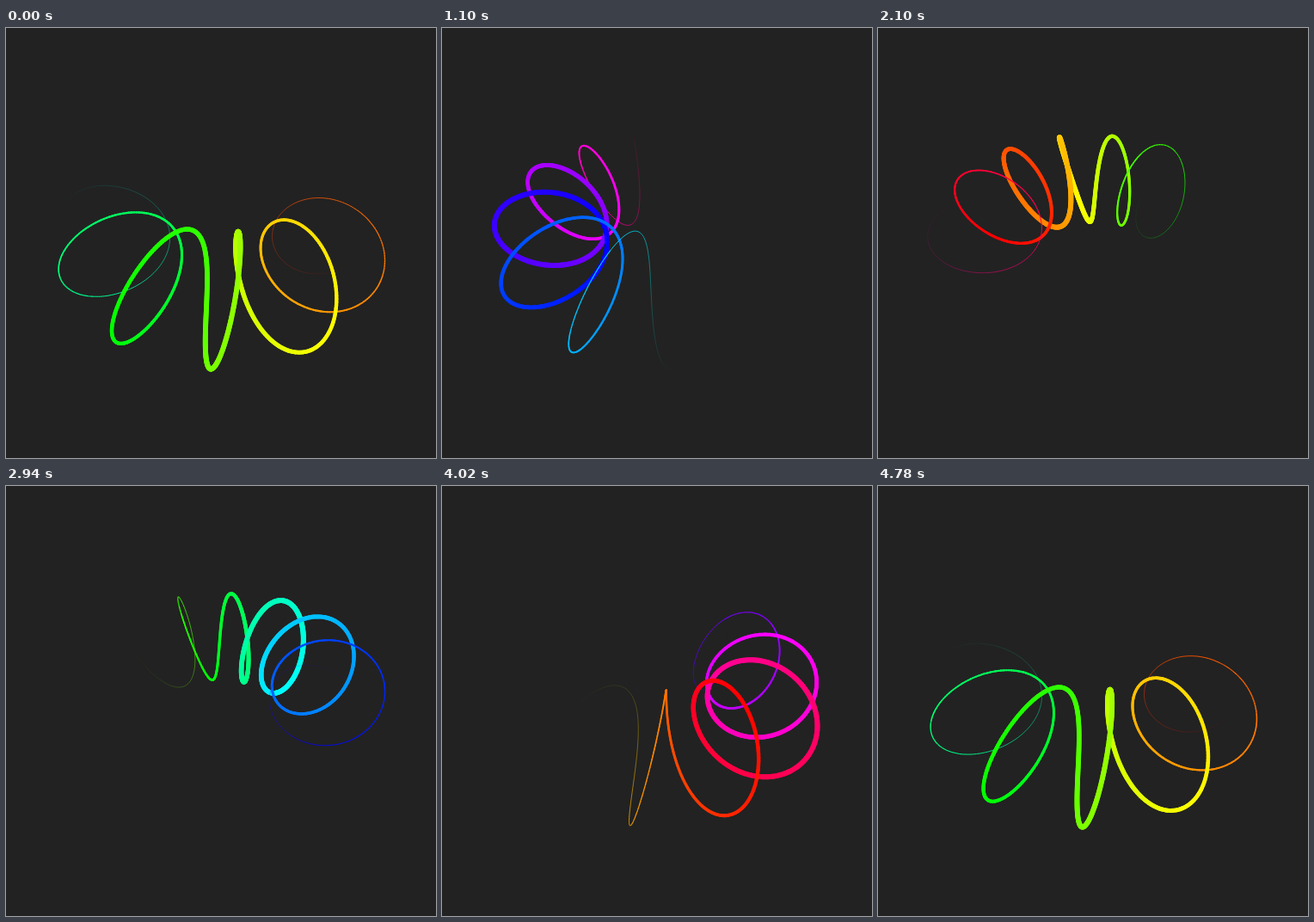
These frames come from a looping animation (500x500 px, 4.8 s). An HTML page with a canvas:

```html
<!DOCTYPE html>
<html lang="en">
<head>
<meta charset="utf-8">
<title>Rainbow coil</title>
<style>
  html, body { margin: 0; width: 100%; height: 100%; overflow: hidden; background: #222; }
  canvas { display: block; width: 500px; height: 500px; }
</style>
</head>
<body>
<canvas id="stage" width="500" height="500"></canvas>
<script>
const ctx = document.getElementById('stage').getContext('2d');
const TAU = Math.PI * 2;
const LOOP = 4800, STEP = 20;
const RING = 120, TUBE = 60, TURNS = 12;
const TILT = Math.PI / 5, LIFT = 20;
const CAMERA = 250 / Math.tan(Math.PI / 6);
const SEGMENTS = 900, MAX_WIDTH = 6;
const SIN = Math.sin(TILT), COS = Math.cos(TILT);

// Point of the coil at ring angle a (front = 0, left = quarter turn), projected to the stage.
function coilPoint(a, progress) {
  const phi = -TURNS * a - TAU * progress;
  const rho = RING + TUBE * Math.cos(phi);
  const up = TUBE * Math.sin(phi);
  const near = rho * Math.cos(a);
  const z = near * COS + up * SIN;
  const scale = CAMERA / (CAMERA - z);
  return {
    x: 250 - rho * Math.sin(a) * scale,
    y: 250 + (near * SIN - up * COS - LIFT) * scale,
    z
  };
}

// The visible half turn of the coil, tapering to nothing at both ends.
function buildSegments(progress) {
  const center = TAU * progress;
  const segments = [];
  let from = coilPoint(center - Math.PI / 2, progress);
  for (let i = 0; i < SEGMENTS; i++) {
    const to = coilPoint(center + Math.PI * ((i + 1) / SEGMENTS - 0.5), progress);
    const offset = Math.PI * ((i + 0.5) / SEGMENTS - 0.5);
    const hue = (offset + 2 * center) * 360 / TAU + 90;
    segments.push({
      from, to,
      z: from.z + to.z,
      width: MAX_WIDTH * Math.cos(offset) ** 2,
      color: `hsl(${(hue % 360 + 360) % 360}, 100%, 50%)`
    });
    from = to;
  }
  return segments.sort((p, q) => p.z - q.z);
}

function draw(ms) {
  const progress = Math.floor(ms % LOOP / STEP) * STEP / LOOP;
  ctx.fillStyle = '#222';
  ctx.fillRect(0, 0, 500, 500);
  for (const { from, to, width, color } of buildSegments(progress)) {
    if (width < 0.01) continue;
    ctx.strokeStyle = color;
    ctx.lineWidth = width;
    ctx.lineCap = width > 1.5 ? 'round' : 'butt';
    ctx.beginPath();
    ctx.moveTo(from.x, from.y);
    ctx.lineTo(to.x, to.y);
    ctx.stroke();
  }
}

function tick() {
  draw(performance.now());
  requestAnimationFrame(tick);
}
tick();
</script>
</body>
</html>
```
